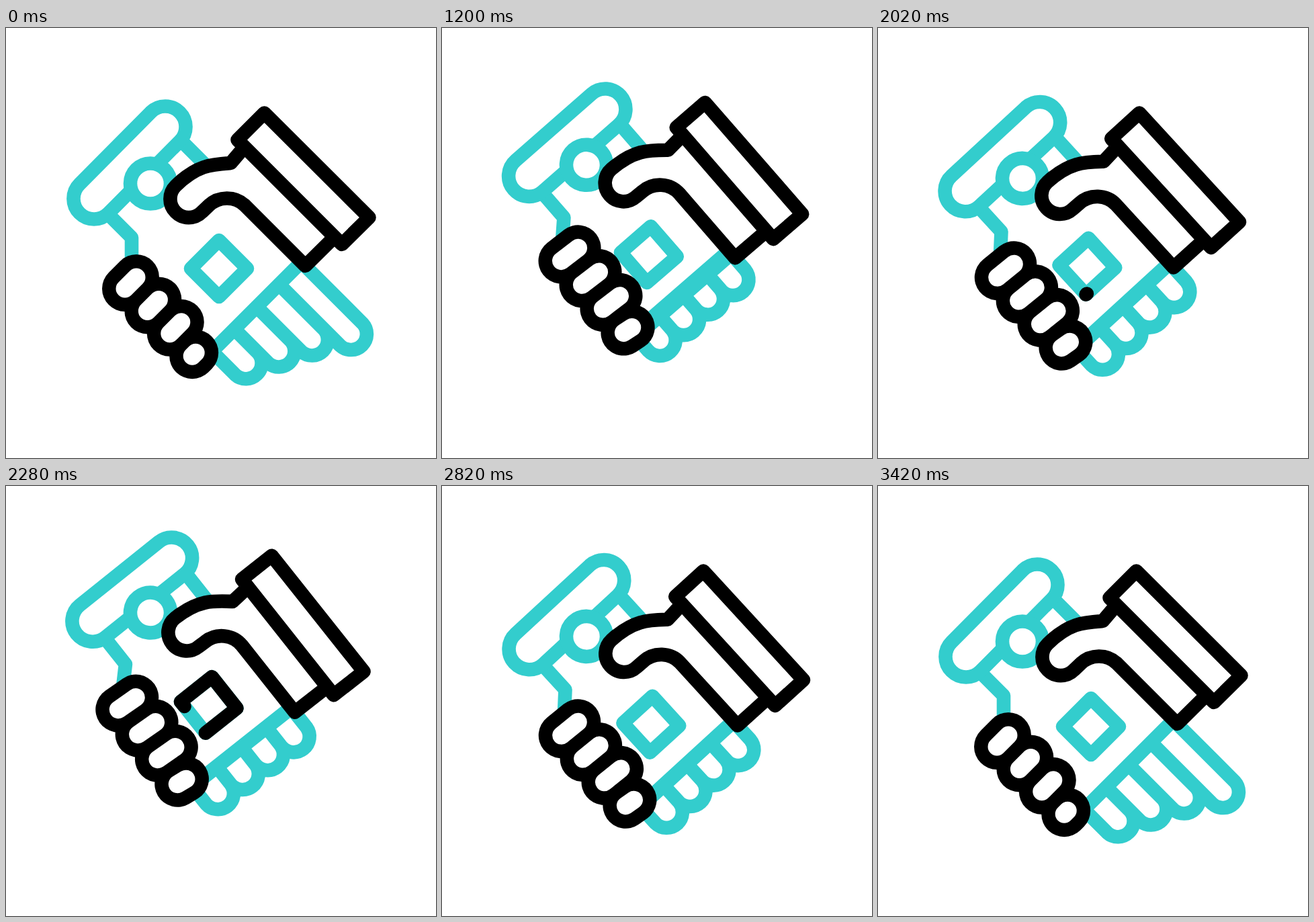
These frames come from a looping animation (640x640 px, 3600 ms). An HTML page:

```html
<!DOCTYPE html>
<html lang="en">
<head>
<meta charset="utf-8">
<title>Handshake</title>
<style>
  html, body { margin: 0; width: 100%; height: 100%; overflow: hidden; background: #fff; }
  svg { display: block; width: 100vw; height: 100vh; }
  .line { fill: none; stroke-width: 20.6; stroke-linejoin: round; stroke-linecap: round; }
  .robot { stroke: #33cdcd; }
  .human { stroke: #000; }
  .solid { fill: #fff; }
  .pill { fill: none; stroke-linecap: round; }
</style>
</head>
<body>
<svg viewBox="0 0 640 640">
  <g id="shake">
    <g class="line robot">
      <path d="M266 173L300 207M155 280L187 312V350"/>
      <path class="solid" d="M215.4 125.4A30.5 30.5 0 0 1 258.6 168.6L152.6 275.6A30.5 30.5 0 0 1 109.4 232.4Z"/>
      <circle class="solid" cx="215" cy="231.5" r="30"/>
      <path d="M317 316L359 358L317 400L275 358Z"/>
      <path id="robotFingers"/>
    </g>
    <path id="fingerEdge" class="pill" stroke="#000" stroke-width="68"/>
    <path id="fingerFill" class="pill" stroke="#fff" stroke-width="27"/>
    <g class="line human">
      <path class="solid" d="M355 177L334.5 201C306 203 284 204 252.5 235A27.5 27.5 0 0 0 291.5 274L301 265C316 250 341 249.5 356 264.5L445.5 354L489 311"/>
      <path class="solid" d="M384.5 126.5L344.5 166.5L500 322L540.5 282Z"/>
      <path id="trace" d="M317 400L359 358L317 316L275 358Z" pathLength="100"/>
    </g>
  </g>
</svg>
<script>
const LOOP = 3600;

// Steps of [time, value], eased between neighbours
const ANGLE = [[1000, 0], [1400, 8], [1800, -5], [2200, 8], [2600, -5], [3000, 8], [3400, 0]];
const LIFT = [[1000, 0], [1400, -55], [1800, 57.5], [2200, -55], [2600, 57.5], [3000, -55], [3400, 0]];
const GRIP = [[40, 0], [1200, 1], [3000, 1], [3420, 0]];
const SQUEEZE = [[40, 0], [1200, 1], [2000, 0]];
const TRACE = [[2000, 0], [2400, 100], [2800, 0]];

// Finger lengths as [open, closed]
const FINGERS = [[49, 33], [71, 33], [94, 33.5], [129, 36.5]];
const KNUCKLE = 16.6;

const $ = id => document.getElementById(id);
const mix = (a, b, u) => a + (b - a) * u;
const ease = u => u * u * (3 - 2 * u);

function at(steps, t) {
  if (t <= steps[0][0]) return steps[0][1];
  for (let i = 1; i < steps.length; i++) {
    const [t0, v0] = steps[i - 1], [t1, v1] = steps[i];
    if (t < t1) return mix(v0, v1, ease((t - t0) / (t1 - t0)));
  }
  return steps[steps.length - 1][1];
}

function robotFingers(grip, squeeze) {
  const push = (grip + 5 * squeeze) * Math.SQRT1_2;
  const palm = 'L440 348';
  let d = `M306.5 481.5${palm}M${306.5 - push} ${481.5 - push}l133.5 -133.5`;
  FINGERS.forEach(([open, closed], i) => {
    const len = (mix(open, closed, grip) - 5 * squeeze) * Math.SQRT1_2;
    const x = 323.2 + 33.25 * i, y = 464.8 - 33.25 * i;
    d += `M${x - KNUCKLE} ${y + KNUCKLE}l${len} ${len}` +
      `a23.5 23.5 0 0 0 ${2 * KNUCKLE} ${-2 * KNUCKLE}l${-len} ${-len}`;
  });
  return d;
}

function humanFingers(grip, squeeze) {
  const shift = 10.6 * grip + 5 * squeeze;
  let d = '';
  for (let i = 0; i < 4; i++) {
    const x = 177 + 33.4 * i + 0.68 * shift;
    const y = 388 + 33.4 * i - 0.73 * shift;
    const reach = i < 3 ? 17 : 5;
    d += `M${x} ${y}l${reach + 6.7 * grip} ${-reach - 4 * grip}`;
  }
  return d;
}

function draw(t) {
  const grip = at(GRIP, t), squeeze = at(SQUEEZE, t), drawn = at(TRACE, t);
  $('shake').setAttribute('transform',
    `translate(0 ${at(LIFT, t)}) rotate(${at(ANGLE, t)} 215 231.5)`);
  $('robotFingers').setAttribute('d', robotFingers(grip, squeeze));
  const fingers = humanFingers(grip, squeeze);
  $('fingerEdge').setAttribute('d', fingers);
  $('fingerFill').setAttribute('d', fingers);
  $('trace').style.visibility = drawn > 0 ? 'visible' : 'hidden';
  $('trace').setAttribute('stroke-dasharray', `${drawn} 200`);
}

const start = performance.now();
function tick() {
  draw((performance.now() - start) % LOOP);
  requestAnimationFrame(tick);
}
draw(0);
requestAnimationFrame(tick);
</script>
</body>
</html>
```
